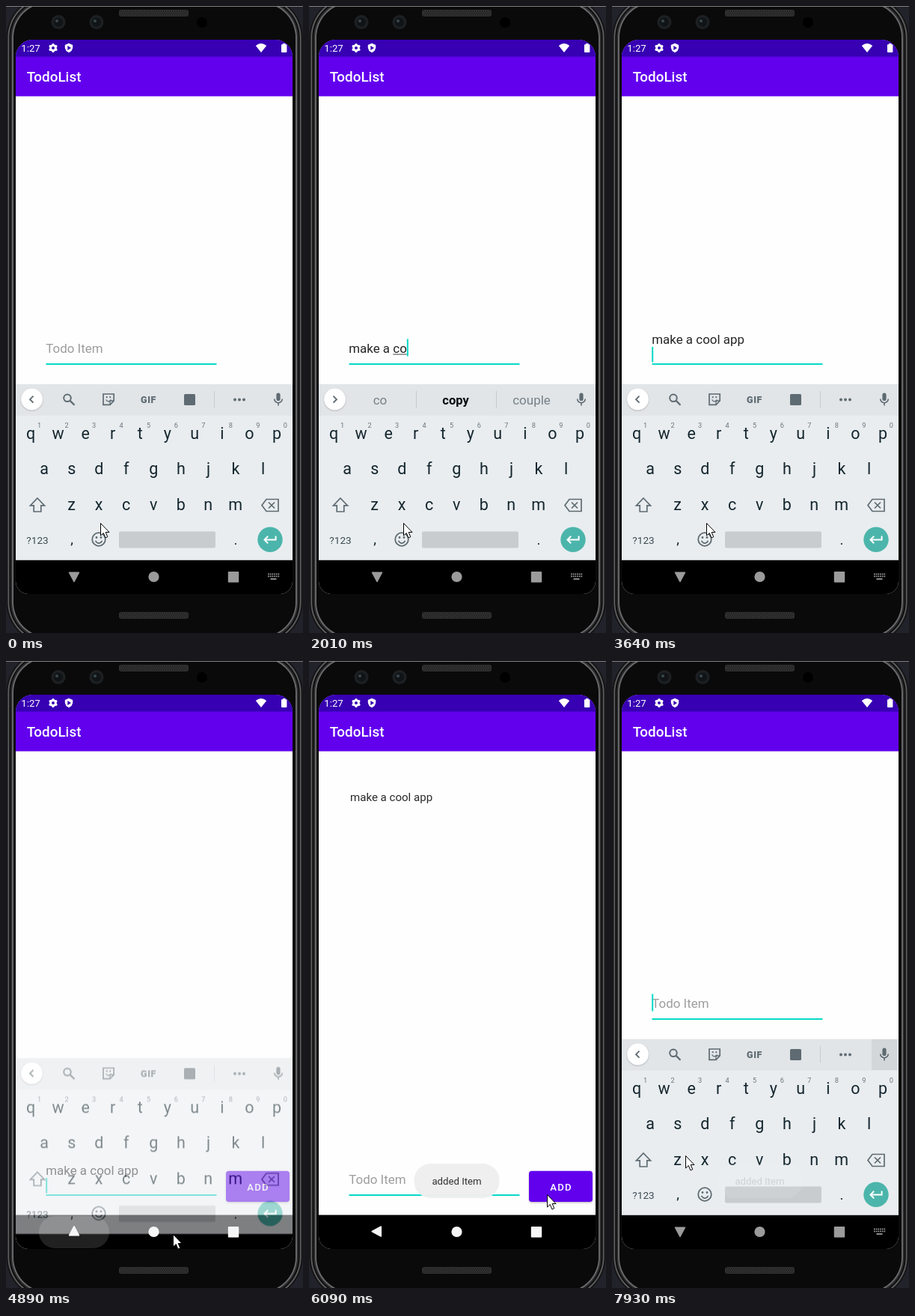
Animation, 397 px wide and 837 px high, one loop 8000 ms. Source, as an HTML page with a canvas:

```html
<!DOCTYPE html>
<html lang="en">
<head>
<meta charset="utf-8">
<title>TodoList</title>
<style>
html, body { margin: 0; width: 100%; height: 100%; overflow: hidden; background: #0b0b0c; }
canvas { display: block; width: 397px; height: 837px; }
</style>
</head>
<body>
<canvas id="stage"></canvas>
<script>
const W = 397, H = 837, LOOP = 8000, STEP = 132;
const DP = 370 / 392.7; // stage pixels per Android dp
const NAV = 739.6;      // top of the navigation bar
const FONT = 'Roboto, "Open Sans", sans-serif';
const TEAL = '#08d9c7', ICON = '#5f6b72', KEY = '#14262e', PURPLE = '#6200ee';
const TAU = Math.PI * 2;
const dpr = window.devicePixelRatio || 1;

function layer(canvas) {
  canvas.width = W * dpr;
  canvas.height = H * dpr;
  const c = canvas.getContext('2d');
  c.scale(dpr, dpr);
  return c;
}
const stage = layer(document.getElementById('stage'));
const board = layer(document.createElement('canvas'));
let g = stage;

// ---- drawing helpers ----
function text(s, x, y, size, color, { weight = 400, align = 'left', gap = 0 } = {}) {
  g.font = `${weight} ${size}px ${FONT}`;
  g.letterSpacing = gap + 'px';
  g.textAlign = align;
  g.fillStyle = color;
  g.fillText(s, x, y);
  return g.measureText(s).width;
}
const center = (s, x, y, size, color, weight) => text(s, x, y, size, color, { weight, align: 'center' });

function rect(x, y, w, h, color, r = 0) {
  g.fillStyle = color;
  g.beginPath();
  g.roundRect(x, y, w, h, r);
  g.fill();
}
function disc(x, y, r, color) {
  g.fillStyle = color;
  g.beginPath();
  g.arc(x, y, r, 0, TAU);
  g.fill();
}
function arc(x, y, r, color, lw, from = 0, to = TAU) {
  g.strokeStyle = color;
  g.lineWidth = lw;
  g.beginPath();
  g.arc(x, y, r, from, to);
  g.stroke();
}
function poly(x, y, pts, { fill, stroke, lw = 1.7, close = !!fill } = {}) {
  g.beginPath();
  pts.forEach(([px, py]) => g.lineTo(x + px, y + py));
  if (close) g.closePath();
  if (fill) { g.fillStyle = fill; g.fill(); }
  if (stroke) { g.strokeStyle = stroke; g.lineWidth = lw; g.stroke(); }
}
function shadow(alpha, blur, dy, draw) {
  g.save();
  g.shadowColor = `rgba(0,0,0,${alpha})`;
  g.shadowBlur = blur * dpr;
  g.shadowOffsetY = dy * dpr;
  draw();
  g.restore();
}

// ---- timing ----
// Motion advances in even steps; 0 before `from`, 1 after `to`.
function ramp(t, from, to) {
  const stepped = Math.floor(t / STEP) * STEP;
  return Math.min(1, Math.max(0, (stepped - from) / (to - from)));
}

const PHRASE = 'make a cool app';
const WORDS = 'make may copy couple cool cooler cook app apple and as'.split(' ');

// Two bursts of typing with a pause between them.
function typedAt(t) {
  if (t < 1140 || t >= 5970) return '';
  const n = t < 2010
    ? Math.floor(7 * Math.min(5, 1 + Math.floor((t - 1140) / 142)) / 5)
    : 9 + Math.floor((t - 2010) / 158);
  return PHRASE.slice(0, n);
}
function suggest(typed) {
  const word = typed.split(' ').pop();
  if (!word) return ['thing', 'new', 'good'];
  const more = WORDS.filter(w => w !== word && w.startsWith(word));
  return [word, more[0] || word + 's', more[1] || word + 'er'];
}

function cursorOn(t) {
  if (t < 120 || (t >= 5970 && t < 7390)) return false;
  if (t >= 1140 && t < 3450) return true;
  const since = t < 1140 ? 120 : t < 7390 ? 3450 : 7390;
  return (t - since) % 1100 < 590;
}

// Each move: start, end, x, y
const MOVES = [[4060, 4480, 93, 763], [4620, 4880, 222, 766], [4880, 5280, 318, 712],
  [6220, 6870, 86, 686], [7650, 7920, 98, 660]];
function pointerAt(t) {
  let x = 126, y = 690;
  for (const [from, to, px, py] of MOVES) {
    const k = ramp(t, from, to);
    x += (px - x) * k;
    y += (py - y) * k;
  }
  return [Math.round(x), Math.round(y)];
}

// ---- phone ----
function phone() {
  rect(0, 0, W, H, '#22222b');
  const shades = ['#141415', '#5c5c5e', '#0d0d0d', '#2c2c2e', '#6a6a6c', '#0a0a0a'];
  shades.forEach((c, i) => {
    const d = .5 + i * 1.9;
    rect(d, d - 14, W - 2 * d, 866 - 2 * d, c, 56 - d);
  });
  rect(0, 0, W, 1, '#808083');
  for (const y of [5, 809]) {
    rect(151, y, 93, 9, '#303030', 3);
    for (let x = 153; x < 242; x += 3)
      for (let j = 0; j < 3; j++) rect(x + (j % 2) * 1.5, y + 1.5 + j * 2.4, 1.2, 1.2, '#171717');
  }
  for (const x of [70, 121]) {
    disc(x, 21.5, 9.5, '#1d2022');
    disc(x, 21.5, 6, '#101416');
    disc(x - 2, 20, 2, '#3c474e');
  }
  disc(262, 22, 7, '#000');
}

function statusBar() {
  rect(13, 45, 370, 75.4, PURPLE);
  rect(13, 45, 370, 22.4, '#3700b3');
  text('1:27', 20.3, 61, 14 * DP, '#fff');
  for (let a = Math.PI / 6; a < TAU; a += TAU / 6)
    disc(63 + 4.4 * Math.cos(a), 56 + 4.4 * Math.sin(a), 1.7, '#fff');
  arc(63, 56, 3.4, '#fff', 2.8);
  poly(84, 56, [[0, -6.2], [5.2, -4], [5.2, 0], [3.5, 4], [0, 6.2], [-3.5, 4], [-5.2, 0], [-5.2, -4]], { fill: '#fff' });
  poly(84, 56, [[-1.7, -3], [3, 0], [-1.7, 3]], { fill: '#3700b3' });
  g.fillStyle = '#fff';
  g.beginPath();
  g.moveTo(341, 62);
  g.lineTo(333.8, 53);
  g.quadraticCurveTo(341, 47, 348.2, 53);
  g.fill();
  rect(368, 51.2, 7.4, 10.8, '#fff', 1);
  rect(370, 50, 3.4, 2, '#fff');
  text('TodoList', 27.8, 101, 20 * DP, '#fff', { weight: 500 });
}

// ---- keyboard ----
function microphone() {
  rect(361.4, 516.5, 5.2, 10.5, ICON, 2.6);
  arc(364, 524.4, 5.3, ICON, 1.6, 0, Math.PI);
  rect(363.2, 529.5, 1.6, 4, ICON);
}

function tools() {
  arc(82, 523.3, 4.8, ICON, 2);
  poly(82, 523.3, [[3.6, 3.6], [9.5, 9.5]], { stroke: ICON, lw: 2.3 });
  poly(137, 525, [[-7, -7], [7.2, -7], [7.2, 2], [2, 7.4], [-7, 7.4]], { stroke: ICON, close: true });
  poly(137, 525, [[7, 2], [2, 2], [2, 7]], { stroke: ICON, lw: 1.3 });
  face(137, 524, .75);
  text('GIF', 190.5, 529.5, 12.5, ICON, { weight: 900, align: 'center', gap: .6 });
  rect(238, 518, 15, 15, ICON, 1.5);
  rect(278, 514, 1, 22, '#c6cbce');
  for (const x of [306, 312, 318]) disc(x, 525.5, 2, ICON);
}

function face(x, y, s) {
  for (const d of [-3, 3]) disc(x + d * s, y - 2.5 * s, 1.4 * s, ICON);
  arc(x, y + .5 * s, 4.6 * s, ICON, 1.7 * s, .3, Math.PI - .3);
}

function toolbar(words, lit) {
  rect(13, 504.7, 370, 42, '#e1e5e8');
  if (lit) rect(347, 505, 34, 41, '#d3d7da');
  shadow(.25, 2, .8, () => disc(34.5, 525, 14.4, '#fff'));
  const d = words ? 1 : -1;
  poly(34.5, 525.2, [[-2 * d, -4.5], [2.4 * d, 0], [-2 * d, 4.5]], { stroke: ICON, lw: 1.9 });
  microphone();
  if (!words) return tools();
  center(words[0], 95, 532, 17, '#768086');
  center(words[1], 196, 532, 16.5, '#080c0e', 700);
  center(words[2], 297.5, 532, 17, '#768086');
  for (const x of [143, 250]) rect(x, 514, 1, 23, '#c6cbce');
}

function keys() {
  rect(13, 546, 370, NAV - 546, '#e9edf0');
  const row = (letters, x, y) => [...letters].forEach((c, i) => center(c, x + i * 36.55, y, 21.5, KEY));
  row('qwertyuiop', 33, 577.5);
  row('1234567890'.replace(/./g, ' '), 33, 577.5);
  for (let i = 0; i < 10; i++) center((i + 1) % 10, 44.5 + i * 36.55, 562.5, 9.2, '#6b767c');
  row('asdfghjkl', 51.2, 625);
  row('zxcvbnm', 87.5, 672.5);
  const outline = { stroke: ICON, close: true };
  poly(42, 666, [[0, -9], [9.5, .8], [4.8, .8], [4.8, 9], [-4.8, 9], [-4.8, .8], [-9.5, .8]], outline);
  poly(353, 666.5, [[-11, 0], [-5, -8], [11, -8], [11, 8], [-5, 8]], outline);
  for (const d of [-4, 4]) poly(355, 666.5, [[-4, d], [4, -d]], { stroke: ICON });
  center('?123', 42, 717.5, 13.6, '#3c4b52');
  center(',', 88, 718, 19, KEY);
  arc(124, 712, 8.8, ICON, 1.8);
  face(124, 712, 1);
  rect(151, 701.5, 129, 22, '#c8cccf', 2);
  center('.', 307, 719, 19, KEY);
  disc(353, 712.3, 16.7, '#4cb5ab');
  const white = { stroke: '#fff', lw: 2 };
  poly(353, 712.5, [[7.6, -5], [7.6, 0], [-7, 0]], white);
  poly(353, 712.5, [[-2.8, -4.7], [-7.5, 0], [-2.8, 4.7]], white);
}

function keyboard(t, words) {
  const shown = 1 - ramp(t, 4695, 5105) + ramp(t, 7140, 7460);
  if (!shown) return;
  g = board;
  g.clearRect(0, 0, W, H);
  keys();
  toolbar(words, t >= 7390);
  g = stage;
  g.globalAlpha = shown;
  g.drawImage(board.canvas, 0, 55 * (1 - shown), W, H);
  g.globalAlpha = 1;
}

// ---- app ----
function field(t, open, typed) {
  const dy = open ? 0 : 235, x = 53.2, size = 18 * DP;
  const wrapped = t >= 3360 && t < 5970;
  const base = (wrapped ? 451 : 462.5) + dy;
  let end = 0;
  if (typed) {
    end = text(typed, x, base, size, '#252525');
    const word = g.measureText(typed.slice(0, typed.lastIndexOf(' ') + 1)).width;
    if (t < 3640) rect(x + word, base + 2, end - word, 1, '#444');
  } else {
    text('Todo Item', x, base, size, '#9d9d9d');
  }
  rect(53.5, 477 + dy, 228, 2, TEAL);
  if (!cursorOn(t)) return;
  if (wrapped) rect(x, 455 + dy, 2, 20.5, TEAL);
  else rect(x + end, 444.5 + dy, 2, 23, TEAL);
}

function addButton(t) {
  shadow(.25, 2.5, 1.2, () => rect(294, 680.8, 85, 41.2, PURPLE, 3.8));
  if (t >= 5690 && t < 5970) rect(294, 680.8, 85, 41.2, 'rgba(255,255,255,.2)', 3.8);
  text('ADD', 337, 706.7, 14 * DP, '#fff', { weight: 500, align: 'center', gap: 1.18 });
}

function navBar(t, open) {
  if (t >= 4610 && t < 5150) rect(44, 741, 94, 43, 'rgba(255,255,255,.13)', 21.5);
  const color = open ? '#9b9b9b' : '#f6f6f6';
  const turn = -90 - 270 * ramp(t, 4700, 4976) - 90 * ramp(t, 7100, 7380);
  g.save();
  g.translate(91, 761.5);
  g.rotate(turn * TAU / 360);
  g.lineJoin = 'round';
  poly(0, 0, [[-6.8, 0], [5.3, -6.5], [5.3, 6.5]], { fill: color, stroke: color, lw: 1.5 });
  g.restore();
  disc(197.5, 762, 7.1, color);
  rect(296.8, 755, 14.4, 14.4, color, 1);
  if (!open) return;
  for (let i = 0; i < 12; i++) rect(350 + (i % 6) * 2.7, i < 6 ? 757.5 : 760.5, 1.7, 1.7, color);
  rect(353.5, 764, 8, 1.8, color);
}

function toast(t) {
  g.globalAlpha = ramp(t, 5830, 6080) * (1 - ramp(t, 7500, 7990));
  rect(140.5, 671, 114, 46, '#efefef', 22);
  center('added Item', 197.5, 699, 14 * DP, '#2a2a2a');
  g.globalAlpha = 1;
}

function pointer(t) {
  const [x, y] = pointerAt(t);
  poly(x + .5, y + .5, [[0, 0], [0, 16.5], [3.8, 13], [6.4, 19.4], [9.3, 18.2], [6.7, 12], [11.5, 12]],
    { fill: '#fff', stroke: '#000', lw: 1 });
}

function draw(t) {
  const open = t < 4750 || t >= 7130;
  const typed = typedAt(t);

  phone();
  g.save();
  g.beginPath();
  g.roundRect(13, 45, 370, 740, [23, 23, 17, 17]);
  g.clip();
  rect(13, 45, 370, 740, '#fefefe');
  statusBar();
  if (t >= 5970 && !open) text(PHRASE, 55, 186.8, 16 * DP, '#2a2a2a');
  field(t, open, typed);
  if (!open) addButton(t);
  rect(13, NAV, 370, 46, '#000');
  keyboard(t, typed && t < 3640 ? suggest(typed) : null);
  navBar(t, open);
  toast(t);
  g.restore();
  pointer(t);
}

const start = performance.now();
function loop() {
  draw((performance.now() - start) % LOOP);
  requestAnimationFrame(loop);
}
loop();
</script>
</body>
</html>
```
